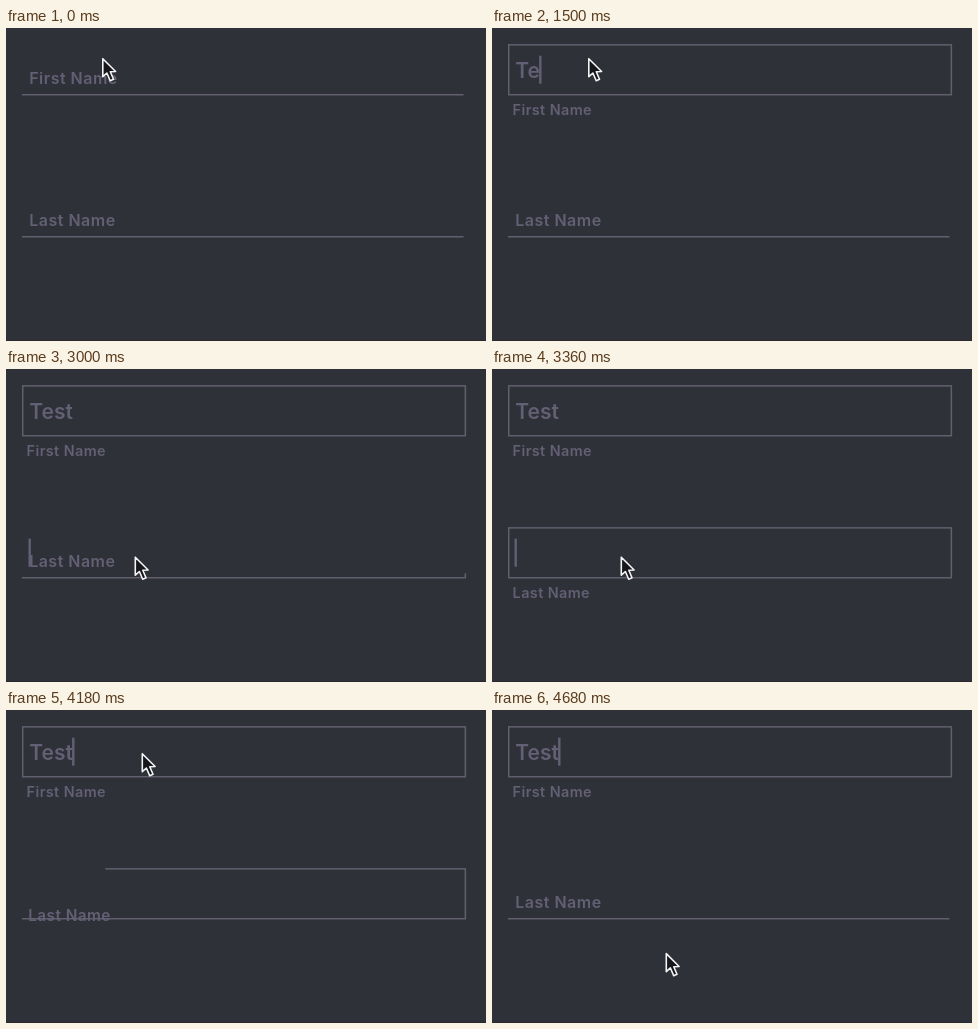
An HTML page with a canvas for the animation above (4720 ms loop, 480 by 313 pixels).

```html
<!DOCTYPE html>
<html lang="en">
<head>
<meta charset="utf-8">
<title>Animated form fields</title>
<style>
  html, body { margin: 0; width: 100%; height: 100%; overflow: hidden; background: #2f3138; }
  canvas { display: block; width: 480px; height: 313px; }
</style>
</head>
<body>
<canvas id="stage" width="480" height="313"></canvas>
<script>
const ctx = document.getElementById('stage').getContext('2d');
const LOOP = 4720;
const FPS = 22;
const FAMILY = 'Inter, "Open Sans", sans-serif';
const INK = '#635f74';
const LINE = '#615f6e';
const VALUE_X = 23.3;

const REST = { x: 96, y: 29.5 };
// bend > 1 makes the sideways motion lag behind the vertical one
const MOVES = [
  { start: 2251, end: 2700, x: 128.5, y: 187, bend: 1.5 },
  { start: 3470, end: 3825, x: 135.5, y: 42.5, bend: 1 },
  { start: 4370, end: 4690, x: 173.5, y: 242.5, bend: 0.85 }
];
const TYPED_AT = [1140, 1500, 1770, 1950];

const FIELDS = [
  { label: 'First Name', value: 'Test', bottom: 67, open: [285, 280],
    caret: [[320, 1000], [1140, 2450], [4000, LOOP]] },
  { label: 'Last Name', value: '', bottom: 209, open: [2998, 380], close: [4050, 400],
    caret: [[3000, 3500]] }
];

const clamp = v => Math.max(0, Math.min(1, v));
const mix = (a, b, p) => a + (b - a) * p;
const smooth = p => p * p * (3 - 2 * p);
const progress = (t, [start, length]) => clamp((t - start) / length);

// The CSS "ease" curve: cubic-bezier(.25, .1, .25, 1)
function ease(x) {
  const bezier = (u, a, b) =>
    3 * a * u * (1 - u) ** 2 + 3 * b * u * u * (1 - u) + u ** 3;
  let lo = 0, hi = 1;
  for (let i = 0; i < 20; i++) {
    const u = (lo + hi) / 2;
    if (bezier(u, 0.25, 0.25) < x) lo = u; else hi = u;
  }
  return bezier(lo, 0.1, 1);
}

function setFont(size, weight, spacing) {
  ctx.font = `${weight} ${size}px ${FAMILY}`;
  ctx.letterSpacing = spacing + 'px';
}

// Sides grow in turn: right side up, top leftwards, left side down
function drawBorder(bottom, p) {
  const top = bottom - 50.9, height = 50.5, w = 1.5;
  const right = clamp(p / 0.2);
  const across = clamp((p - 0.2) / 0.4);
  const left = clamp((p - 0.6) / 0.35);
  ctx.fillStyle = LINE;
  ctx.fillRect(16, bottom - 1, p > 0 ? 444 : 441.5, w);
  ctx.fillRect(458.6, bottom - height * right, w, height * right);
  ctx.fillRect(460 - 444 * across, top, 444 * across, w);
  ctx.fillRect(16, top, w, height * left);
}

function drawField(field, t) {
  const { bottom } = field;
  const opening = progress(t, field.open);
  const closing = field.close ? progress(t, field.close) : 0;
  const border = closing > 0 ? clamp(1 - closing / 0.72) : opening;
  const drop = closing > 0 ? 1 - ease(closing) : ease(opening);

  drawBorder(bottom, border);

  ctx.fillStyle = INK;
  setFont(mix(16, 14.4, drop), 600, mix(0.5, 0.42, drop));
  ctx.fillText(field.label, mix(23.2, 20.6, drop), mix(bottom - 11, bottom + 20, drop));

  const typed = field.value.slice(0, TYPED_AT.filter(at => t >= at).length);
  setFont(21, 600, 0);
  ctx.fillText(typed, VALUE_X, bottom - 17);

  if (field.caret.some(([on, off]) => t >= on && t < off)) {
    const x = VALUE_X + ctx.measureText(typed).width - 0.8;
    ctx.fillRect(x, bottom - 39.3, 2.4, 28);
  }
}

function pointerAt(t) {
  let { x, y } = REST;
  for (const move of MOVES) {
    const p = smooth(progress(t, [move.start, move.end - move.start]));
    x = mix(x, move.x, p ** move.bend);
    y = mix(y, move.y, p);
  }
  return { x, y };
}

function drawPointer({ x, y }) {
  ctx.save();
  ctx.translate(x, y);
  ctx.beginPath();
  ctx.moveTo(0.8, 1.2);
  ctx.lineTo(0.8, 19.2);
  ctx.lineTo(4.9, 15.5);
  ctx.lineTo(8.2, 23.2);
  ctx.lineTo(11.5, 21.8);
  ctx.lineTo(8.3, 14.3);
  ctx.lineTo(13.6, 14);
  ctx.closePath();
  ctx.fillStyle = '#16171b';
  ctx.fill();
  ctx.lineWidth = 1.6;
  ctx.lineJoin = 'round';
  ctx.strokeStyle = '#f4f4f6';
  ctx.stroke();
  ctx.restore();
}

function draw(now) {
  // Hold each picture for one step of the 22 fps clock
  const step = Math.floor((now % LOOP + 5) * FPS / 1000);
  const t = step * 1000 / FPS + 5;
  ctx.fillStyle = '#2f3138';
  ctx.fillRect(0, 0, 480, 313);
  ctx.fillStyle = '#2b282e';
  ctx.fillRect(0, 312, 480, 1);
  FIELDS.forEach(field => drawField(field, t));
  drawPointer(pointerAt(t));
}

let start = null;
function tick(now) {
  if (start === null) start = now;
  draw(Math.max(0, now - start));
  requestAnimationFrame(tick);
}
draw(0);
requestAnimationFrame(tick);
</script>
</body>
</html>
```
